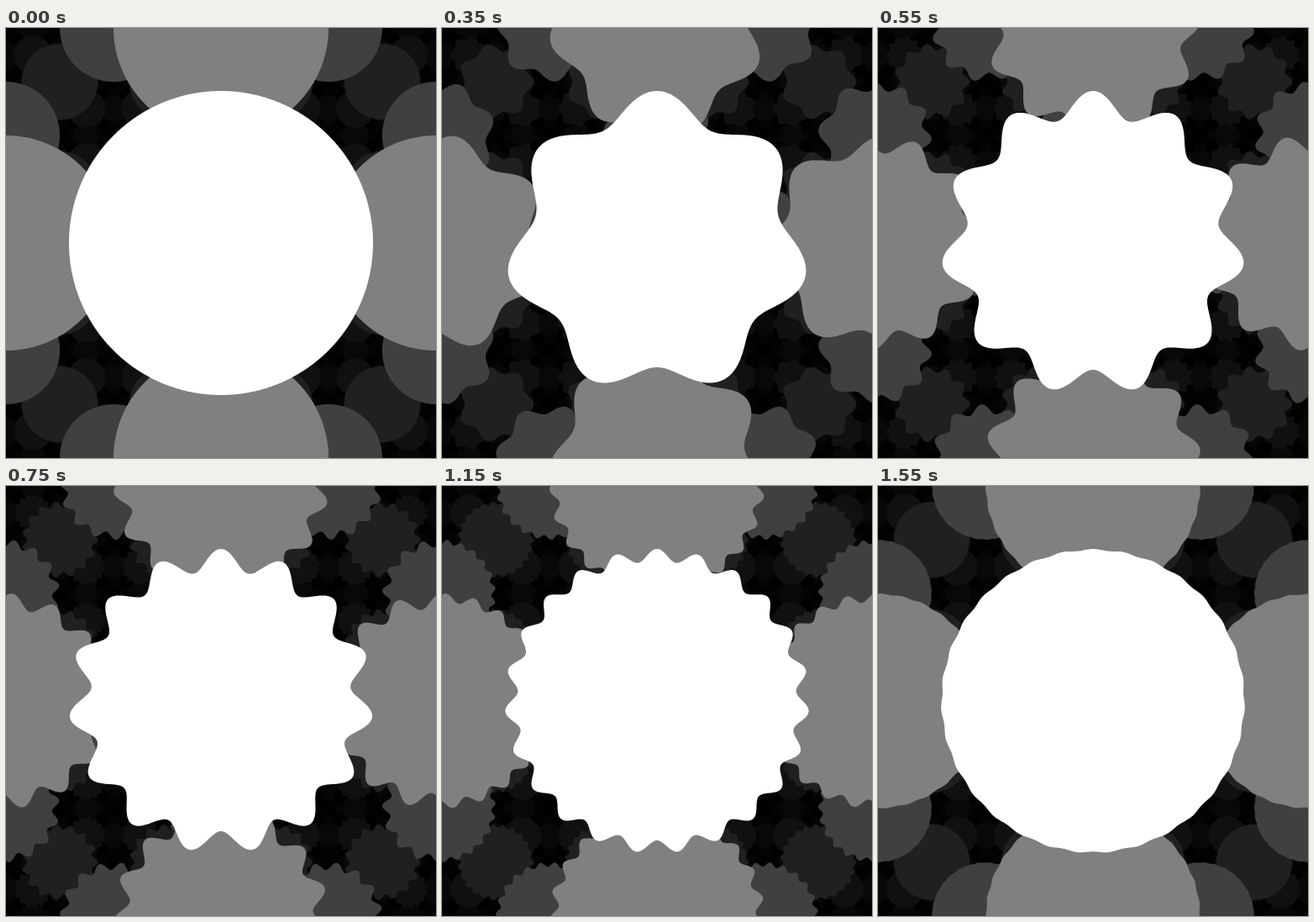
Recreate the animation shown at these times as an HTML page with a canvas. Size 512 px wide and 512 px high, loop 1600 ms.

```html
<!DOCTYPE html>
<html lang="en">
<head>
<meta charset="utf-8">
<title>Rippling discs</title>
<style>
html, body { margin: 0; width: 512px; height: 512px; overflow: hidden; background: #000; }
canvas { display: block; }
</style>
</head>
<body>
<canvas id="stage" width="512" height="512"></canvas>
<script>
const SIZE = 512, STEPS = 32, STEP_MS = 50, DEPTH = 0.1935;
const ctx = document.getElementById('stage').getContext('2d');

// Each level shrinks by sqrt(2), every third one stays empty,
// and the turn from one disc to the next grows by 45 degrees.
const levels = [0, 1, 3, 4, 6, 7, 9, 10].map((level, i) => ({
  radius: SIZE / 2 / Math.SQRT2 * 2 ** (-level / 2),
  turn: -i * (i + 1) / 2 * Math.PI / 4,
  grey: Math.round(255 / 2 ** i),
  centres: lattice(level)
}));

// Even levels sit in the cell centres, odd ones on a checkerboard.
function lattice(level) {
  const odd = level % 2;
  const gap = SIZE / 2 ** Math.ceil(level / 2);
  const shift = odd ? 0 : gap / 2;
  const count = SIZE / gap;
  const list = [];
  for (let a = 0; a <= count; a++)
    for (let b = 0; b <= count; b++)
      if (!odd || (a + b) % 2) list.push([a * gap + shift, b * gap + shift]);
  return list;
}

function wavyDisc(radius, turn, lobes) {
  const path = new Path2D();
  const depth = DEPTH / 2 * Math.cos(Math.PI / 2 * lobes / STEPS);
  const points = Math.max(120, Math.round(radius * 6));
  for (let i = 0; i < points; i++) {
    const a = 2 * Math.PI * i / points;
    const r = radius * (1 - depth * (1 - Math.cos(lobes * a)));
    path.lineTo(r * Math.sin(a + turn), -r * Math.cos(a + turn));
  }
  path.closePath();
  return path;
}

function draw(lobes) {
  ctx.fillStyle = '#000';
  ctx.fillRect(0, 0, SIZE, SIZE);
  for (const { radius, turn, grey, centres } of [...levels].reverse()) {
    const disc = wavyDisc(radius, turn, lobes);
    ctx.fillStyle = `rgb(${grey},${grey},${grey})`;
    for (const [x, y] of centres) {
      ctx.setTransform(1, 0, 0, 1, x, y);
      ctx.fill(disc);
    }
  }
  ctx.setTransform(1, 0, 0, 1, 0, 0);
}

let shown = 0, start = null;
function tick(now) {
  start ??= now;
  const lobes = Math.floor((now - start) / STEP_MS) % STEPS;
  if (lobes !== shown) draw(shown = lobes);
  requestAnimationFrame(tick);
}
draw(0);
requestAnimationFrame(tick);
</script>
</body>
</html>
```
